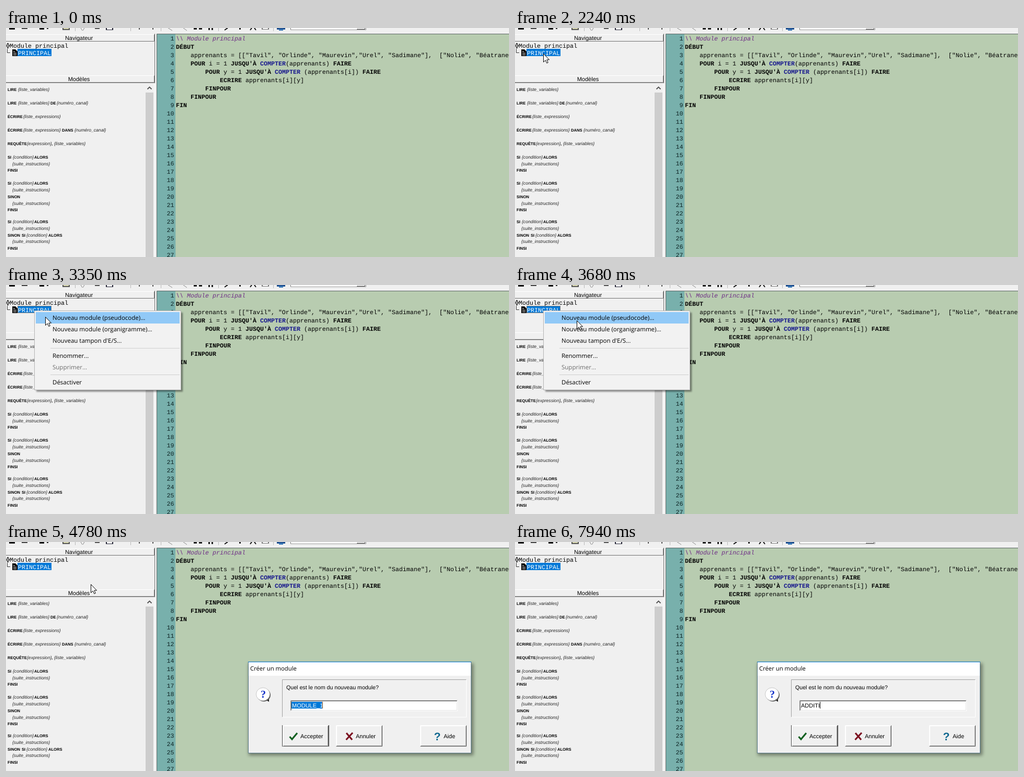
Write an HTML page that moves like this. It is 962x440 px and loops after 8000 ms.

```html
<!DOCTYPE html>
<html lang="fr">
<head>
<meta charset="utf-8">
<title>Créer un module</title>
<style>
html, body { margin: 0; width: 100%; height: 100%; overflow: hidden; background: #f0f0f0; }
svg { display: block; width: 962px; height: 440px; }
text { white-space: pre; text-rendering: geometricPrecision; }
.code { font: 11.667px "Liberation Mono", monospace; }
.code .key { font-weight: bold; }
.code .fn { font-weight: bold; fill: #14148c; }
.code .note { font-style: italic; fill: #6e2c86; }
.num { text-anchor: end; fill: #0c2222; }
.sans { font: 11px "Liberation Sans", Arial, sans-serif; }
.ui { font: 11.5px "Open Sans", sans-serif; }
.kw { font: bold 7.6px "Liberation Sans", Arial, sans-serif; }
.arg { font: italic 8.6px "Liberation Sans", Arial, sans-serif; fill: #222; }
.inv { mix-blend-mode: difference; }
</style>
</head>
<body>
<svg id="stage" viewBox="0 0 962 440" xmlns="http://www.w3.org/2000/svg"></svg>
<script>
const LOOP = 8000, STEP = 45, BLINK = 510;
const BLUE = '#0078d7';

const rect = (x, y, w, h, fill, more = '') =>
  `<rect x="${x}" y="${y}" width="${w}" height="${h}" fill="${fill}" ${more}/>`;
const text = (x, y, s, cls, more = '') => `<text x="${x}" y="${y}" class="${cls}" ${more}>${s}</text>`;
const line = (d, color, w = 1, more = '') =>
  `<path d="${d}" fill="none" stroke="${color}" stroke-width="${w}" ${more}/>`;
const bevel = (x, y, w, h, light, dark) =>
  line(`M${x + .5} ${y + h - .5}V${y + .5}H${x + w - .5}`, light) +
  line(`M${x + .5} ${y + h - .5}H${x + w - .5}V${y + .5}`, dark);

// ---- editor ----
const program = [
  '\\\\ Module principal',
  'DÉBUT',
  '    apprenants = [["Tavil", "Orlinde", "Maurevin","Urel", "Sadimane"],  ["Nolie", "Béatrane',
  "    POUR i = 1 JUSQU'À COMPTER(apprenants) FAIRE",
  "        POUR y = 1 JUSQU'À COMPTER (apprenants[i]) FAIRE",
  '            ECRIRE apprenants[i][y]',
  '        FINPOUR',
  '    FINPOUR',
  'FIN'
];
const paint = s => s.startsWith('\\') ? `<tspan class="note">${s}</tspan>` :
  s.replace(/DÉBUT|FINPOUR|FIN|POUR|JUSQU'À|FAIRE|ECRIRE/g, '<tspan class="key">$&</tspan>')
   .replace(/COMPTER/g, '<tspan class="fn">$&</tspan>');

function editor() {
  let out = rect(288, 11, 674, 429, '#b8ccb0') + rect(289, 12, 35, 428, '#78b0ac') +
    line('M288.5 440V11.5H962', '#5c6664') + line('M324.5 220V440', '#a4c4b0');
  for (let i = 0; i < 27; i++) out += text(321.5, 24 + 16 * i, i + 1, 'code num');
  program.forEach((s, i) => {
    const body = s.trimStart();
    out += text(325 + 7 * (s.length - body.length), 24 + 16 * i, paint(body), 'code');
  });
  return out;
}

// ---- toolbar edge ----
function toolbar() {
  const bits = [
    [6, 0, 11, 3, '#111'], [30, 0, 11, 2, '#444'], [64, 0, 9, 3, '#111'], [78, 0, 3, 2, '#333'],
    [108, 0, 14, 4, '#555'], [110, 0, 10, 2, '#d8d8b0'], [170, 0, 9, 2, '#555'],
    [191, 0, 14, 4, '#223'], [193, 0, 10, 3, '#fff'], [254, 0, 2, 3, '#555'], [280, 0, 2, 3, '#555'],
    [359, 0, 6, 3, '#222'], [369, 0, 6, 3, '#222'], [387, 0, 3, 4, '#222'], [393, 0, 3, 4, '#222'],
    [446, 0, 3, 3, '#222'], [489, 0, 14, 3, '#777'], [491, 0, 10, 2, '#fff'],
    [518, 0, 16, 3, '#205090'], [522, 2, 8, 3, '#3878b8']
  ];
  return bits.map(b => rect(...b)).join('') +
    line('M143 0l3 5M150 0l-3 5M310 0l8 5M339 0l7 5', '#888') +
    line('M418 4l6 -4M467 4l3 -4M478 4l-3 -4', '#111', 2) +
    [132, 238, 296, 406, 511].map(x => rect(x, 0, 1, 6, '#b8b8b8')).join('') +
    rect(545, 0, 143, 4, '#fff') + bevel(544, -8, 145, 12, '#777', '#999') +
    rect(671, 0, 15, 3, '#e4e4e4') + line('M671 2.5H686.5V0', '#555');
}

// ---- left side ----
const header = (y, s) => rect(0, y, 284, 14, '#f0f0f0') + bevel(-1, y, 285, 14, '#fff', '#707070') +
  text(139.5, y + 11, s, 'sans', 'text-anchor="middle"');

const LV = '{liste_variables}', CH = '{numéro_canal}', SI = '{suite_instructions}', IF = '{condition}';
const templates = [
  [121, 3, 'LIRE', 23, LV],
  [147, 3, 'LIRE', 23, LV, 85, 'DE', 97, CH],
  [173, 3, 'ÉCRIRE', 33, '{liste_expressions}'],
  [199, 3, 'ÉCRIRE', 33, '{liste_expressions}', 107, 'DANS', 131, CH],
  [225, 3, 'REQUÊTE', 40, '{expression}', 87, ',', 92, LV],
  [251, 3, 'SI', 13, IF, 54, 'ALORS'], [264, 12, SI], [276, 3, 'FINSI'],
  [301, 3, 'SI', 13, IF, 54, 'ALORS'], [314, 12, SI], [327, 3, 'SINON'], [340, 12, SI], [352, 3, 'FINSI'],
  [375, 3, 'SI', 13, IF, 54, 'ALORS'], [388, 12, SI],
  [401, 3, 'SINON', 30, 'SI', 39, IF, 81, 'ALORS'], [413, 12, SI], [426, 3, 'FINSI']
];

function sidebar() {
  let out = header(12, 'Navigateur') + header(91, 'Modèles') + line('M284.5 11V106', '#707070') +
    line('M0 105.5H284', '#a0a0a0') +
    text(7, 38, 'Module principal', 'code') +
    line('M3.5 29V39M0 34H7', '#111', 3) + line('M3.5 30V38M0 34H6', '#f0f0f0') +
    line('M2.5 40V47.5H8', '#333') +
    '<path d="M12 41h6l4 4v9H12z" fill="#111"/>' + line('M14 45.5h3M14 48.5h6M14 51.5h6', '#ddd') +
    rect(22, 40, 65, 14, BLUE) + text(23, 52, 'PRINCIPAL', 'code', 'fill="#fff"') +
    '<rect id="focus" x="22.5" y="40.5" width="64" height="13" fill="none" stroke="#ff8728" stroke-dasharray="1 1"/>';
  for (const [y, ...runs] of templates)
    for (let i = 0; i < runs.length; i += 2)
      out += text(runs[i], y, runs[i + 1], runs[i + 1][0] === '{' ? 'arg' : 'kw');
  return out + rect(267, 106, 16, 334, '#f0f0f0') + rect(267, 124, 15, 316, '#cdcdcd') +
    line('M270.5 117.5L274.5 113.5L278.5 117.5', '#505050', 1.8) + line('M283.5 106V440', '#fff');
}

// ---- context menu ----
const item = (y, s, fill = '#000') => text(89, y, s, 'ui', `fill="${fill}"`);
const menu = () => `<g id="menu">` +
  rect(58, 53, 280, 152, '#000', 'opacity=".42" style="filter:blur(1.6px)"') +
  rect(54.5, 49.5, 280, 152, '#f2f2f2', 'stroke="#b4b4b4"') +
  rect(57, 52, 275, 22, '#91c9f7', 'id="hover"') +
  item(67, 'Nouveau module (pseudocode)...') + item(89, 'Nouveau module (organigramme)...') +
  item(111, "Nouveau tampon d'E/S...") + item(140, 'Renommer...') +
  item(162, 'Supprimer...', '#6d6d6d') + item(191, 'Désactiver') +
  line('M85 121.5H332M85 172.5H332', '#cfcfcf') + '</g>' +
  '<g id="ghost">' + rect(57, 52, 275, 22, '#91c9f7') + item(67, 'Nouveau module (pseudocode)...') + '</g>';

// ---- dialog ----
const button = (x, w, tx, s) => rect(x, 352, w, 41, '#f0f0f0') + bevel(x, 352, w, 41, '#fff', '#606060') +
  bevel(x + 1, 353, w - 2, 39, '#fff', '#a0a0a0') + text(tx, 377, s, 'sans');

const dialog = () => '<g id="dialog">' +
  rect(464, 233, 430, 177, '#000', 'opacity=".4" style="filter:blur(3px)"') +
  rect(463, 230, 427, 176, '#f0f0f0') + rect(464, 231, 425, 26, '#fff') +
  rect(463.5, 230.5, 426, 175, 'none', 'stroke="#5a7c8c"') + rect(463, 230, 427, 1, BLUE) +
  text(467, 247, 'Créer un module', 'ui', 'style="font-size:11.3px"') +
  '<path d="M496 303l7 4v-6z" fill="#222"/><ellipse cx="493" cy="294" rx="13" ry="12.5" fill="#555"/>' +
  '<ellipse cx="491.5" cy="292.5" rx="13" ry="12.5" fill="#fff" stroke="#b0b0b0" stroke-width=".7"/>' +
  text(492, 299, '?', '', `text-anchor="middle" fill="#1030c8" style="font:bold 20px 'Liberation Serif',serif"`) +
  bevel(528, 264, 353, 73, '#a0a0a0', '#fff') +
  text(536, 283, 'Quel est le nom du nouveau module?', 'sans', 'style="font-size:10.65px"') +
  rect(544, 304, 320, 21, '#fff') + bevel(544, 304, 320, 21, '#a0a0a0', '#fff') +
  bevel(545, 305, 318, 19, '#606060', '#e3e3e3') +
  rect(546, 307, 60, 13, BLUE, 'id="sel"') + text(547, 318, '', 'sans', 'id="entry"') +
  rect(528, 352, 90, 41, '#444') + button(529, 88, 563, 'Accepter') +
  button(631, 89, 669, 'Annuler') + button(792, 89, 837, 'Aide') +
  line('M542.5 374L547 379L557 367', '#106020', 3.2) +
  line('M651 367L662 380M663 366.5L650.5 380', '#7c1020', 3.2) +
  text(825, 381, '?', '', `text-anchor="middle" fill="#106890" style="font:bold 21px 'Liberation Sans',sans-serif"`) +
  '</g>' + rect(605, 307, 1, 13, '#fff', 'id="caret" class="inv"');

// ---- pointers ----
const pointers = () => '<circle id="click" r="12" fill="#ff0" fill-opacity=".47"/>' +
  '<path id="arrow" d="M.5 .5V16.5L4.2 13L6.8 18.5L9.2 17.4L6.8 12H11.5Z" fill="#fff" stroke="#000"/>' +
  '<g id="beam" class="inv">' + line('M-3 -7.5H-1L0 -6.5L1 -7.5H3M0 -7V7M-3 7.5H-1L0 6.5L1 7.5H3', '#fff') + '</g>' +
  '<g id="split">' + line('M-7 -1.5H7M-7 1.5H7', '#fff', 3) + line('M-7 -1.5H7M-7 1.5H7M0 -6V-2M0 2V6', '#000') +
  '<path d="M0 -9L4 -4.5H-4ZM0 9L4 4.5H-4Z" stroke="#fff" stroke-width=".5"/></g>';

const stage = document.getElementById('stage');
stage.innerHTML = rect(0, 0, 962, 440, '#f0f0f0') + toolbar() + editor() + sidebar() + menu() + dialog() + pointers();
const el = {};
for (const id of ['focus', 'menu', 'hover', 'ghost', 'dialog', 'sel', 'entry', 'caret', 'click', 'arrow', 'beam', 'split'])
  el[id] = document.getElementById(id);

// ---- timeline ----
const path = [
  [530, 652, 415], [790, 526, 300], [1040, 505, 288], [1350, 121, 109], [1690, 113, 104],
  [2240, 54, 49], [3230, 57, 52], [3500, 110, 79], [3680, 118, 68], [3910, 118, 58],
  [4580, 118, 58], [4780, 162, 81], [5060, 633, 314]
];
const holds = [790, 1350, 2240, 3910, 5060]; // pointer rests after these times
const keys = [[4420, 'MODULE_1'], [6180, 'A'], [6410, 'AD'], [6540, 'ADD'], [7330, 'ADDI'], [7560, 'ADDIT'], [7940, 'ADDITI']];
const fades = {
  menu: [[2710, .5], [2740, 1], [4370, 0]],
  ghost: [[4370, .82], [4430, .5], [4480, .2], [4530, 0]],
  dialog: [[4480, .35], [4530, .75], [4580, 1]]
};

const last = (table, t) => table.filter(r => r[0] <= t).pop();
const show = (node, on) => node.setAttribute('visibility', on ? 'visible' : 'hidden');

function pointerAt(t) {
  const i = path.indexOf(last(path, t)), a = path[i], b = path[i + 1];
  if (!b || holds.includes(a[0])) return [a[1], a[2]];
  const u = Math.floor((t - a[0]) / STEP) * STEP / (b[0] - a[0]);
  return [1, 2].map(k => Math.round(a[k] + (b[k] - a[k]) * u));
}

function shape(t, x, y) {
  if (t < 530 || t >= 6180) return '';
  if (t >= 4370) return x > 544 && x < 864 && y > 304 && y < 325 ? 'beam' : 'arrow';
  if (x > 324) return 'beam';
  return t < 2710 && x < 284 && y > 99 && y < 107 ? 'split' : 'arrow';
}

function draw(t) {
  for (const id in fades) {
    const f = last(fades[id], t);
    el[id].setAttribute('opacity', f ? f[1] : 0);
  }
  show(el.focus, t >= 2570 && t < 4370);

  const [x, y] = t < 530 ? [0, 0] : pointerAt(t), kind = shape(t, x, y);
  for (const id of ['arrow', 'beam', 'split']) {
    show(el[id], id === kind);
    const dx = id === 'arrow' ? 0 : .5;
    el[id].setAttribute('transform', `translate(${x + dx} ${y})`);
  }
  show(el.click, (t >= 2570 && t < 2710) || (t >= 4190 && t < 4370));
  el.click.setAttribute('cx', x);
  el.click.setAttribute('cy', y);

  const row = y >= 74 ? 1 : 0;
  show(el.hover, t >= 3230 && t < 4370 && x >= 57 && y >= 52);
  el.hover.setAttribute('y', 52 + 22 * row);

  const key = last(keys, t) || keys[0], fresh = key === keys[0];
  if (el.entry.textContent !== key[1]) el.entry.textContent = key[1];
  el.entry.setAttribute('fill', fresh ? '#fff' : '#000');
  show(el.sel, fresh);
  const end = fresh ? 605 : Math.round(547 + el.entry.getComputedTextLength());
  el.caret.setAttribute('x', end);
  show(el.caret, t >= 4580 && Math.floor((t - key[0]) / BLINK) % 2 === 0);
}

const start = performance.now();
function tick() {
  draw((performance.now() - start) % LOOP);
  requestAnimationFrame(tick);
}
tick();
</script>
</body>
</html>
```
